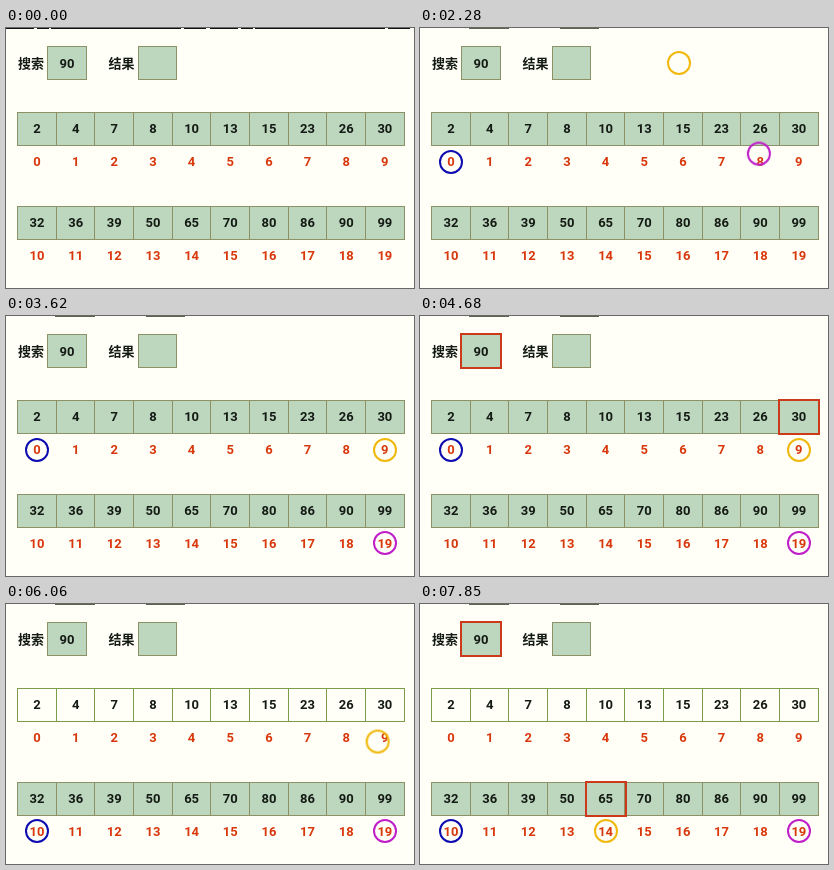
An HTML page that plays this animation: 408 px wide and 260 px high, repeating every 8 s.

```html
<!DOCTYPE html>
<html lang="zh">
<head>
<meta charset="utf-8">
<title>Binary search</title>
<style>
  html, body { margin: 0; width: 100%; height: 100%; overflow: hidden; background: #fffff7; }
  svg { display: block; width: 408px; height: 260px; }
  text { font: bold 13px Roboto, Arial, sans-serif; text-anchor: middle; fill: #141a14; }
  .label { font: bold 13px "Noto Sans CJK SC", "Noto Sans CJK", sans-serif; }
  .index { fill: #d8380c; }
  .cell { fill: #bcd7be; stroke: #8c9266; }
  .ring { fill: none; stroke-width: 2; }
  .mark rect { fill: none; stroke: #cc3a1c; stroke-width: 2; }

  .old, .new, .ring, .mark, .first .cell { animation: 8s linear infinite; }
  .old { animation-name: old; }
  .new { animation-name: new; }
  .low { animation-name: low; stroke: #0c0cb0; }
  .mid { animation-name: mid; stroke: #f0b80c; }
  .high { animation-name: high; stroke: #c01ec8; }
  .first .cell { animation-name: discard; }
  .mark1 { animation-name: mark1; }
  .mark2 { animation-name: mark2; }

  /* 1% = 80 ms */
  @keyframes old { 0%, 10.62% { opacity: 1 } 10.63%, 100% { opacity: 0 } }
  @keyframes new { 0%, 10.62% { opacity: 0 } 10.63%, 100% { opacity: 1 } }
  @keyframes low {
    0% { transform: translate(215px, 35px); opacity: 0 }
    10.125% { opacity: 1 }
    13.2% { transform: translate(215px, 35px) }
    19.875%, 63% { transform: translate(31px, 134px) }
    69.625%, 100% { transform: translate(31px, 227px); opacity: 1 }
  }
  @keyframes high {
    0% { transform: translate(303px, 35px); opacity: 0 }
    10.125% { opacity: 1 }
    24.5% { transform: translate(303px, 35px) }
    33%, 100% { transform: translate(379px, 227px); opacity: 1 }
  }
  @keyframes mid {
    0% { transform: translate(259px, 35px); opacity: 0 }
    10.125% { opacity: 1 }
    37.5% { transform: translate(259px, 35px) }
    44.7%, 75.5% { transform: translate(379px, 134px) }
    82.375%, 100% { transform: translate(186px, 227px); opacity: 1 }
  }
  @keyframes discard {
    0%, 63% { fill-opacity: 1; stroke: #8c9266 }
    69.625%, 100% { fill-opacity: 0; stroke: #7c9c4c }
  }
  @keyframes mark1 {
    0%, 48.375% { opacity: 0 }
    49.875%, 50.75% { opacity: 1 }
    51.875%, 57% { opacity: 0 }
    58.5%, 63.4% { opacity: 1 }
    64.6%, 100% { opacity: 0 }
  }
  @keyframes mark2 {
    0%, 87.5% { opacity: 0 }
    89%, 94.125% { opacity: 1 }
    95.625%, 96.625% { opacity: 0 }
    98.125%, 100% { opacity: 1 }
  }
</style>
</head>
<body>
<svg id="stage" viewBox="0 0 408 260">
  <path class="old" d="M0 .5H408" stroke="#111" stroke-dasharray="28 3 12 2 130 3 22 4"/>
  <path class="new" d="M49 .5H89M140 .5H179" stroke="#5c6450"/>
  <text class="label" x="25" y="39.5">搜索</text>
  <text class="label" x="115.5" y="39.5">结果</text>
  <rect class="cell" x="41.5" y="18.5" width="39" height="33"/>
  <text x="61" y="39.5">90</text>
  <rect class="cell" x="132.5" y="18.5" width="38" height="33"/>
  <g id="row1" class="first"></g>
  <g id="row2"></g>
  <g class="mark mark1">
    <rect x="41" y="18" width="40" height="34"/>
    <rect x="359" y="84" width="40" height="34"/>
  </g>
  <g class="mark mark2">
    <rect x="41" y="18" width="40" height="34"/>
    <rect x="166" y="178" width="40" height="34"/>
  </g>
  <circle class="ring low" r="11"/>
  <circle class="ring mid" r="11"/>
  <circle class="ring high" r="11"/>
</svg>
<script>
  const values = [2, 4, 7, 8, 10, 13, 15, 23, 26, 30, 32, 36, 39, 50, 65, 70, 80, 86, 90, 99];
  const pitch = 38.65;
  const edge = i => Math.round(12 + i * pitch) - 0.5;

  function fillRow(id, start, top) {
    let out = '';
    for (let i = 0; i < 10; i++) {
      const mid = 31 + i * pitch;
      out += `<rect class="cell" x="${edge(i)}" y="${top}" width="${edge(i + 1) - edge(i)}" height="33"/>` +
        `<text x="${mid}" y="${top + 20.5}">${values[start + i]}</text>` +
        `<text class="index" x="${mid}" y="${top + 53.5}">${start + i}</text>`;
    }
    document.getElementById(id).innerHTML = out;
  }

  fillRow('row1', 0, 84.5);
  fillRow('row2', 10, 178.5);
</script>
</body>
</html>
```
